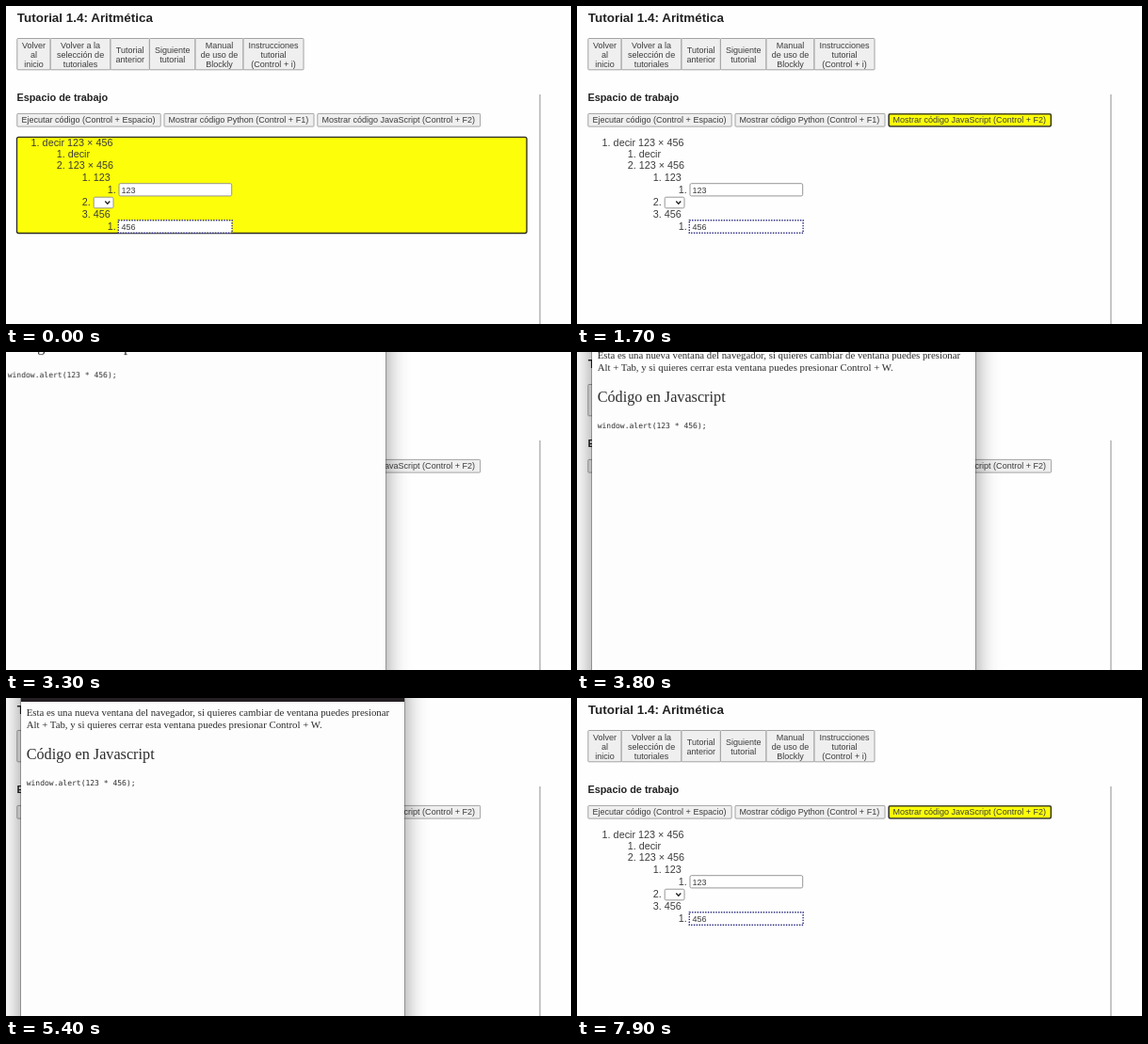
Write an HTML page that moves like this. It is 600 px wide and 338 px high and loops after 8 s.

```html
<!DOCTYPE html>
<html lang="es">
<head>
<meta charset="utf-8">
<title>Tutorial 1.4: Aritmética</title>
<style>
  html, body { margin: 0; width: 100%; height: 100%; overflow: hidden; background: #fefefe; }
  svg { display: block; }
  #stage { position: absolute; inset: 0; overflow: hidden; }
  #page { position: absolute; left: 0; top: 0; }
  text { white-space: pre; }
  #page text { font-family: "Liberation Sans", Arial, sans-serif; fill: #3c3c3c; }
  #page .head { font-size: 10.9px; font-weight: 700; fill: #222; }
  #page .title { font-size: 13.45px; }
  .list text { font-size: 10.82px; }
  #page .ui { font-size: 9.03px; }
  .mid { text-anchor: middle; }
  .btn { fill: #efefef; stroke: #9a9a9a; stroke-width: .9; }
  .field { fill: #fff; stroke: #8c8c8c; stroke-width: .9; }
  .chosen { fill: #fff; stroke: #2c2c80; stroke-width: 1.4; stroke-dasharray: 1.4 1.4; }
  .focus { fill: #fdff0a; stroke: #2c2c20; stroke-width: 1.35; }
  #workFocus { animation: workFocus 8s step-end infinite; }
  #jsFocus { animation: jsFocus 8s step-end infinite; }

  #win {
    position: absolute; left: 16px; top: -75px; width: 407px; height: 490px;
    overflow: hidden; border-radius: 6px; background: #fdfdfd;
    box-shadow: 0 0 0 .7px rgba(0,0,0,.4), 0 12px 24px rgba(0,0,0,.45);
    transform-origin: 203.5px 287px;
    animation: win 8s linear infinite;
  }
  #win text { font-family: "Liberation Serif", "Times New Roman", serif; font-size: 10.82px; fill: #2c2c2c; }
  #win .h2 { font-size: 16.22px; }
  #win .code { font-family: "DejaVu Sans Mono", monospace; font-size: 8.03px; }

  @keyframes workFocus { 0% { opacity: 1 } 18.75%, 100% { opacity: 0 } }
  @keyframes jsFocus {
    0% { opacity: 0 } 18.75% { opacity: 1 } 28.75% { opacity: 0 }
    93.75%, 100% { opacity: 1 }
  }
  @keyframes win {
    0%, 28.75% { opacity: 0; transform: translate(-46px, -105px) scale(.83) }
    31.25% { opacity: .76; transform: translate(-46px, -105px) scale(.926) }
    33.75%, 39.375% { opacity: 1; transform: translate(-46px, -105px) scale(1) }
    41.25% { transform: translate(-20px, -66px) scale(1) }
    47.5% { transform: translate(0, -12px) scale(1) }
    52.5% { transform: translate(0, 0) scale(1) }
    92.5% { opacity: 1; transform: translate(0, 0) scale(1) }
    95%, 100% { opacity: 0; transform: translate(0, 0) scale(1) }
  }
</style>
</head>
<body>
<div id="stage">
  <svg id="page" width="600" height="338" viewBox="0 0 600 338">
    <text class="head title" x="11.8" y="17.2">Tutorial 1.4: Aritmética</text>
    <g id="tools"></g>
    <text class="head" x="11.4" y="100.9">Espacio de trabajo</text>
    <path d="M567 94V338" stroke="#a8a8a8" stroke-width="1.3"/>
    <g id="actions"></g>
    <g id="jsFocus">
      <rect class="focus" x="331.2" y="114.8" width="172.1" height="13" rx="1.5"/>
      <text class="ui" x="335.4" y="124.4">Mostrar código JavaScript (Control + F2)</text>
    </g>
    <rect id="workFocus" class="focus" x="11.5" y="139.3" width="541.5" height="102.2" rx="2"/>
    <g class="list" id="list"></g>
    <rect class="field" x="120" y="188.7" width="119.7" height="13.2" rx="1.5"/>
    <text class="ui" x="122.6" y="198.5">123</text>
    <rect class="field" x="93.2" y="203.2" width="20.8" height="11.6" rx="1.5"/>
    <path d="M105.3 207.6l2.5 2.6 2.5-2.6" fill="none" stroke="#222" stroke-width="1.4"/>
    <rect class="chosen" x="119.3" y="227.7" width="120.8" height="13.6"/>
    <text class="ui" x="122.6" y="237.7">456</text>
  </svg>

  <div id="win">
    <svg width="407" height="490" viewBox="16 -75 407 490">
      <rect x="16" y="-75" width="407" height="79" fill="#231f23"/>
      <text x="21.7" y="19.5">Esta es una nueva ventana del navegador, si quieres cambiar de ventana puedes presionar</text>
      <text x="21.7" y="31.8">Alt + Tab, y si quieres cerrar esta ventana puedes presionar Control + W.</text>
      <text class="h2" x="21.7" y="65">Código en Javascript</text>
      <text class="code" x="21.7" y="93.4">window.alert(123 * 456);</text>
    </svg>
  </div>
</div>

<script>
  const tools = [
    [11.8, 47.2, "Volver|al|inicio"],
    [47.2, 111, "Volver a la|selección de|tutoriales"],
    [111, 152.4, "Tutorial|anterior"],
    [152.4, 201, "Siguiente|tutorial"],
    [201, 252, "Manual|de uso de|Blockly"],
    [252, 316, "Instrucciones|tutorial|(Control + i)"]
  ];
  const actions = [
    [11.8, 164.2, "Ejecutar código (Control + Espacio)"],
    [168, 327, "Mostrar código Python (Control + F1)"],
    [330.8, 503.6, "Mostrar código JavaScript (Control + F2)"]
  ];
  // indent level, baseline, label
  const items = [
    [0, 148.6, "1. decir 123 × 456"], [1, 161.1, "1. decir"],
    [1, 173.3, "2. 123 × 456"], [2, 185.7, "1. 123"], [3, 198.5, "1."],
    [2, 212.2, "2."], [2, 224.6, "3. 456"], [3, 237.8, "1."]
  ];
  const fill = (id, rows, draw) =>
    document.getElementById(id).innerHTML = rows.map(draw).join("");
  const box = (l, r, y, h) =>
    `<rect class="btn" x="${l}" y="${y}" width="${r - l}" height="${h}" rx=".8"/>`;

  fill("tools", tools, ([l, r, label]) => {
    const lines = label.split("|");
    const top = 54.7 - (lines.length - 1) * 5.1;
    return box(l, r, 34.5, 33.3) + lines.map((s, i) =>
      `<text class="ui mid" x="${(l + r) / 2}" y="${top + i * 10.2}">${s}</text>`).join("");
  });
  fill("actions", actions, ([l, r, label]) =>
    box(l, r, 114.4, 13.7) + `<text class="ui" x="${l + 4.6}" y="124.4">${label}</text>`);
  fill("list", items, ([level, y, label]) =>
    `<text x="${26.6 + level * 27.05}" y="${y}">${label}</text>`);
</script>
</body>
</html>
```
